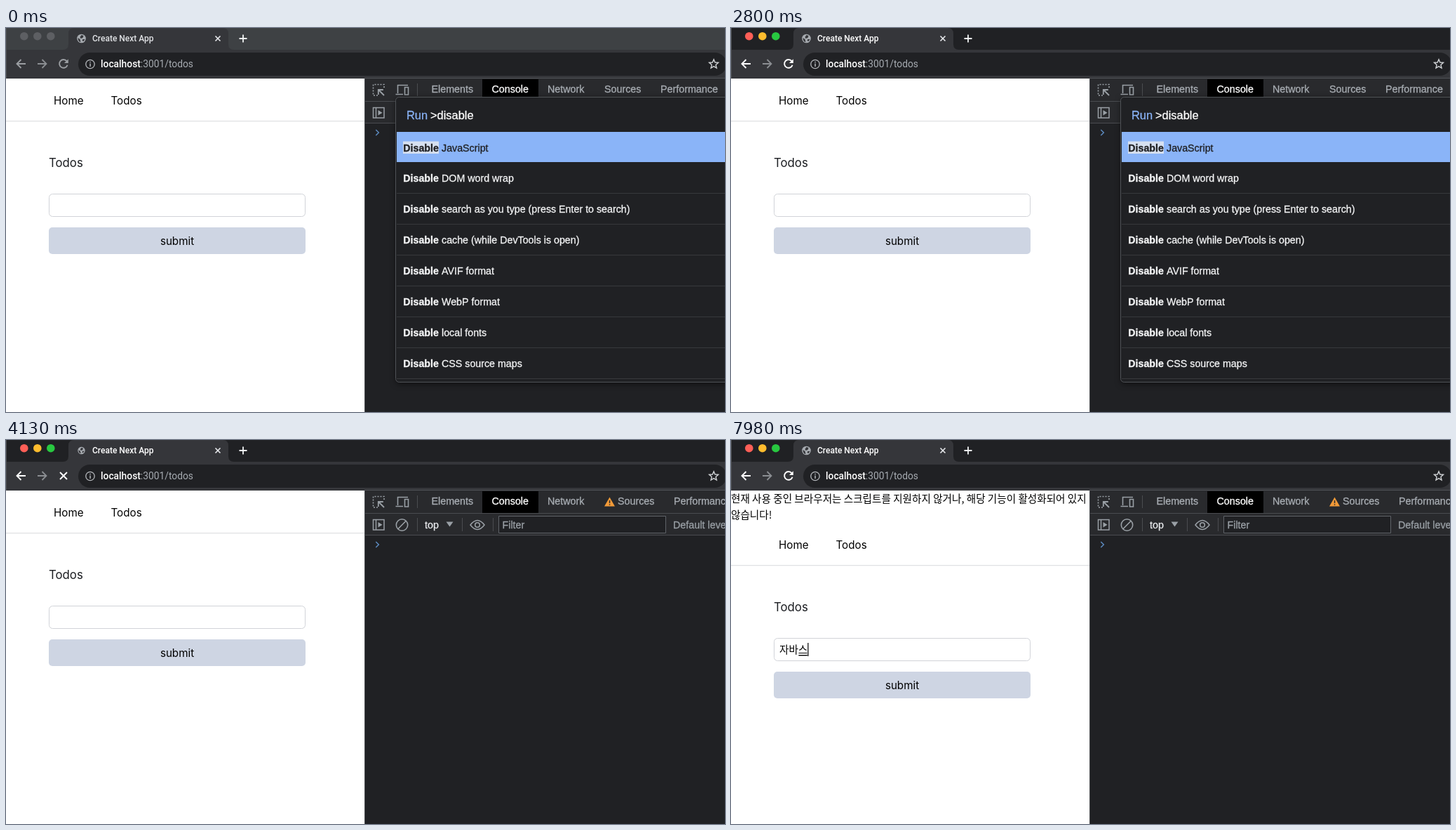
Write an HTML page with a canvas that moves like this. It is 1025 px wide and 547 px high and loops after 8 s.

```html
<!DOCTYPE html>
<html lang="en">
<head>
<meta charset="utf-8">
<title>Todos without scripts</title>
<style>
  html, body { margin: 0; width: 100%; height: 100%; overflow: hidden; background: #202124; }
  canvas { display: block; width: 1025px; height: 547px; }
</style>
</head>
<body>
<canvas id="stage"></canvas>
<script>
const W = 1025, H = 547, LOOP = 8000;
const canvas = document.getElementById('stage');
const ctx = canvas.getContext('2d');
const dpr = window.devicePixelRatio || 1;
canvas.width = W * dpr;
canvas.height = H * dpr;

const UI = 'Roboto, sans-serif';
const PAGE = 'Inter, sans-serif';
const TOOLS = '"Liberation Sans", Arial, sans-serif';
const KOREAN = '"Noto Sans CJK KR", "Noto Sans CJK", sans-serif';
const DARK = '#202124', BAR = '#35363a', TOOLBAR = '#292a2d';
const GRAY = '#9aa0a6', PALE = '#e8eaed', EDGE = '#4a4c50';
const SPLIT = 511; // left edge of the tools panel

// Moments of the session, in ms
const FOCUS = 1750, RUN = 2870, RELOAD = 3990, ARRIVE = 4200, LOADED = 4340;

const COMMANDS = ['JavaScript', 'DOM word wrap', 'search as you type (press Enter to search)',
  'cache (while DevTools is open)', 'AVIF format', 'WebP format', 'local fonts', 'CSS source maps'];
const NOTICE = ['현재 사용 중인 브라우저는 스크립트를 지원하지 않거나, 해당 기능이 활성화되어 있지', '않습니다!'];
const TYPING = [[7350, 'ㅈ'], [7490, '자'], [7630, '잡'], [7770, '자바'], [7840, '자밧'], [7980, '자바스']];

const within = (t, from, to) => t >= from && t < to;

function rect(x, y, w, h, color) {
  ctx.fillStyle = color;
  ctx.fillRect(x, y, w, h);
}

function rounded(x, y, w, h, r, fill, border) {
  ctx.beginPath();
  ctx.roundRect(x, y, w, h, r);
  if (fill) { ctx.fillStyle = fill; ctx.fill(); }
  if (border) { ctx.strokeStyle = border; ctx.lineWidth = 1; ctx.stroke(); }
}

function disc(x, y, r, color) {
  ctx.beginPath();
  ctx.arc(x, y, r, 0, Math.PI * 2);
  ctx.fillStyle = color;
  ctx.fill();
}

function stroke(d, color, width = 1.5) {
  ctx.strokeStyle = color;
  ctx.lineWidth = width;
  ctx.stroke(new Path2D(d));
}

function fill(d, color) {
  ctx.fillStyle = color;
  ctx.fill(new Path2D(d));
}

// Draws a run of text and returns the x where it ends
function text(str, x, y, font, color, align = 'left') {
  ctx.font = font;
  ctx.fillStyle = color;
  ctx.textAlign = align;
  ctx.fillText(str, x, y);
  return x + ctx.measureText(str).width;
}

// Panel text, with a hairline outline for its slightly heavy smoothing
function label(str, x, y, size, color, weight = 'normal') {
  const end = text(str, x, y, `${weight} ${size}px ${TOOLS}`, color);
  ctx.strokeStyle = color;
  ctx.lineWidth = 0.3;
  ctx.strokeText(str, x, y);
  return end;
}

function globe(x, y, scale) {
  ctx.save();
  ctx.translate(x, y);
  ctx.scale(scale, scale);
  disc(0, 0, 6.3, '#a7abb0');
  fill('M-5 -1 L-2 1 L-1 5 L-3 4.6 Q-5 3 -5 -1Z M0 -5 L3 -4 L2 -1 L-1 0 L-2 -2Z M2 1 L5 1 L3 4 L1 3Z', BAR);
  ctx.restore();
}

function star(x, y, r) {
  ctx.beginPath();
  for (let i = 0; i < 10; i++) {
    const a = i * Math.PI / 5 - Math.PI / 2, q = i % 2 ? r * 0.45 : r;
    ctx.lineTo(x + q * Math.cos(a), y + q * Math.sin(a));
  }
  ctx.closePath();
  ctx.strokeStyle = '#d0d3d6';
  ctx.lineWidth = 1.4;
  ctx.stroke();
}

function drawBrowser(t) {
  const active = t >= FOCUS;
  const loading = within(t, RELOAD, LOADED);
  const icon = active ? '#ffffff' : '#9b9ea2';

  rect(0, 0, W, 31, active ? DARK : '#3e4144');
  rect(0, 31, W, 41, BAR);
  fill('M81 31 Q89 31 89 23 V8 Q89 0 97 0 H309 Q317 0 317 8 V23 Q317 31 325 31Z', BAR);
  rect(0, 0, 1, 72, '#4b4d50');

  const lights = active ? ['#ff5f57', '#febc2e', '#28c840'] : ['#5d5f63', '#5d5f63', '#5d5f63'];
  lights.forEach((c, i) => disc(25.8 + 19 * i, 11.7, 5.8, c));

  globe(107.5, 15, within(t, RELOAD, 4480) ? 0.82 : 1);
  text('Create Next App', 123, 19, '500 12px ' + UI, active ? '#ffffff' : '#e0e2e5');
  stroke('M298.5 11.5 l7 7 m0 -7 l-7 7', PALE, 1.6);
  stroke('M338 9.5 v11 m-5.5 -5.5 h11', '#f1f3f4', 1.8);

  stroke('M28 51 H15.5 M21.5 45 l-6 6 l6 6', icon, 1.9);
  stroke('M45 51 h12.5 M51.5 45 l6 6 l-6 6', '#8b8e92', 1.8);
  if (loading) {
    stroke('M77 46 l10 10 m0 -10 l-10 10', icon, 1.9);
  } else {
    stroke('M86.6 47.2 A5.9 5.9 0 1 0 87.6 52.7', icon, 1.9);
    fill('M88.8 44.2 V50 H83Z', icon);
  }

  rounded(103, 35, 924, 33, 16.5, DARK);
  ctx.beginPath();
  ctx.arc(120, 51.5, 6.2, 0, Math.PI * 2);
  ctx.strokeStyle = '#b5b8bc';
  ctx.lineWidth = 1.3;
  ctx.stroke();
  rect(119.3, 50.5, 1.5, 4.5, '#b5b8bc');
  rect(119.3, 47.8, 1.5, 1.5, '#b5b8bc');
  const x = text('localhost', 135, 56, '500 13.8px ' + UI, '#ffffff');
  text(':3001/todos', x, 56, '13.8px ' + UI, '#a6abb1');
  star(1009, 51.5, 6.8);
}

function drawInput(t) {
  const typed = TYPING.filter(k => t >= k[0]).pop();
  let x = 69.5;
  if (typed) {
    const end = text(typed[1], 69, 303.5, '14.6px ' + KOREAN, '#000');
    const start = 69 + ctx.measureText(typed[1].slice(0, -1)).width;
    rect(start + 0.5, 306, end - start - 1, 1.4, '#000');
    x = end;
  }
  if (within(t, 6020, 6580) || t >= 7070) rect(x, 289, 1.2, 19, '#000');
}

function drawPage(t) {
  const plain = t >= ARRIVE;
  rect(0, 72, SPLIT, H - 72, '#ffffff');
  if (plain) NOTICE.forEach((s, i) => text(s, 0, 89 + 23 * i, '14.6px ' + KOREAN, '#000'));

  ctx.save();
  ctx.translate(0, plain ? 46 : 0);
  text('Home', 68, 109, '15.2px ' + PAGE, '#000');
  text('Todos', 149.5, 109, '15.2px ' + PAGE, '#000');
  rect(0, 132, SPLIT, 1, '#e0e1e3');
  rect(0, 133, SPLIT, 1, '#f7f7f8');
  text('Todos', 61, 198, '16.8px ' + PAGE, '#1b1d21');
  rounded(61.5, 236.5, 365, 32, 5, '#fff', '#d1d3d8');
  rounded(61, 284, 366, 38, 5, '#ced5e3');
  text('submit', 244, 308.5, '15.2px ' + PAGE, '#000', 'center');
  ctx.restore();

  drawInput(t);
}

function drawTabs(warn) {
  const tab = (s, x, color = '#a8adb3') => label(s, x, 92.3, 14.3, color);
  rect(679, 73, 80, 31, '#000');
  tab('Elements', 606.5);
  tab('Console', 692.5, '#fff');
  tab('Network', 772);
  tab('Sources', warn ? 872 : 853);
  tab('Performance', warn ? 952 : 933);
  if (warn) {
    fill('M860.5 81.5 L868 94.5 H853Z', '#f29a38');
    rect(859.8, 86, 1.5, 4, TOOLBAR);
    rect(859.8, 91.3, 1.5, 1.5, TOOLBAR);
  }
}

function drawTools(t) {
  rect(SPLIT, 72, W - SPLIT, H - 72, DARK);
  rect(SPLIT, 72, W - SPLIT, 63, TOOLBAR);
  rect(SPLIT, 72, 1, H - 72, EDGE);
  rect(SPLIT, 71, W - SPLIT, 1, '#505256');
  rect(SPLIT, 104, W - SPLIT, 1, EDGE);
  rect(SPLIT, 135, W - SPLIT, 1, EDGE);
  drawTabs(t >= RUN);

  // Inspect and device icons
  ctx.setLineDash([2, 2]);
  stroke('M530 96 H523.5 V80.5 H539 V87', GRAY, 1.6);
  ctx.setLineDash([]);
  stroke('M539 96 L531.5 88.5 M530.8 95 V88 H537.8', GRAY, 1.8);
  stroke('M558.5 93 V81.5 H573 M555.5 94.5 H566 M568.5 84.5 H573.5 V95 H568.5Z', GRAY, 1.6);

  // Console row
  stroke('M523.5 113.5 H539 V128 H523.5Z M527.5 113.5 V128', GRAY, 1.5);
  fill('M530.5 117 L536.5 120.8 L530.5 124.5Z', GRAY);
  stroke('M556.3 121 a8.2 8.2 0 1 0 16.4 0 a8.2 8.2 0 1 0 -16.4 0 M570.2 115.2 L558.8 126.8', GRAY, 1.6);
  rect(586, 79, 1, 18, EDGE);
  [586, 650, 694].forEach(x => rect(x, 111, 1, 19, EDGE));
  label('top', 597, 126, 14.3, PALE);
  fill('M627.5 116.5 H637.5 L632.5 123.5Z', GRAY);
  stroke('M662 121 Q672 108 682 121 Q672 134 662 121Z', GRAY, 1.5);
  stroke('M668.7 121 a3.3 3.3 0 1 0 6.6 0 a3.3 3.3 0 1 0 -6.6 0', GRAY, 1.6);
  rounded(702.5, 108.5, 238, 24, 0, DARK, '#5f6368');
  label('Filter', 707.5, 126, 14.3, GRAY);
  label('Default levels', 951, 126, 14.3, GRAY);

  stroke('M527.3 145 l4 4 l-4 4', '#5c8abf', 1.5);
  if (within(t, RUN, 3290) || within(t, 3710, RELOAD)) rect(542, 141, 1, 15, PALE);
}

function drawMenu(t) {
  const pitch = 43.9;
  ctx.save();
  ctx.shadowColor = 'rgba(0,0,0,.55)';
  ctx.shadowBlur = 9;
  ctx.shadowOffsetY = 2;
  rounded(556, 98.5, 500, 406.5, 5, DARK);
  ctx.restore();

  label('Run', 571, 129.5, 16.4, '#8ab4f8');
  const end = label('>disable', 605, 129.5, 16.4, '#fff');
  if (within(t, FOCUS, 2240)) rect(end, 115, 1, 18, '#fff');

  rect(557, 148, W - 557, 43, '#8ab4f8');
  rect(566, 161.5, 51, 17.5, '#d6e0f0');
  COMMANDS.forEach((name, i) => {
    const y = 175.5 + pitch * i;
    const color = i ? '#f4f5f6' : DARK;
    label('Disable', 566.3, y, 14.2, color, 'bold');
    label(name, 621, y, 14.25, color);
    if (i) rect(557, Math.round(191.5 + pitch * i), W - 557, 1, '#37393c');
  });
  rounded(555.5, 98.5, 500, 406, 5, null, '#505357');
}

function draw(t) {
  ctx.setTransform(dpr, 0, 0, dpr, 0, 0);
  drawBrowser(t);
  drawPage(t);
  drawTools(t);
  if (t < RUN) drawMenu(t);
}

const began = performance.now();
function tick() {
  draw((performance.now() - began) % LOOP);
  requestAnimationFrame(tick);
}
tick();
</script>
</body>
</html>
```
